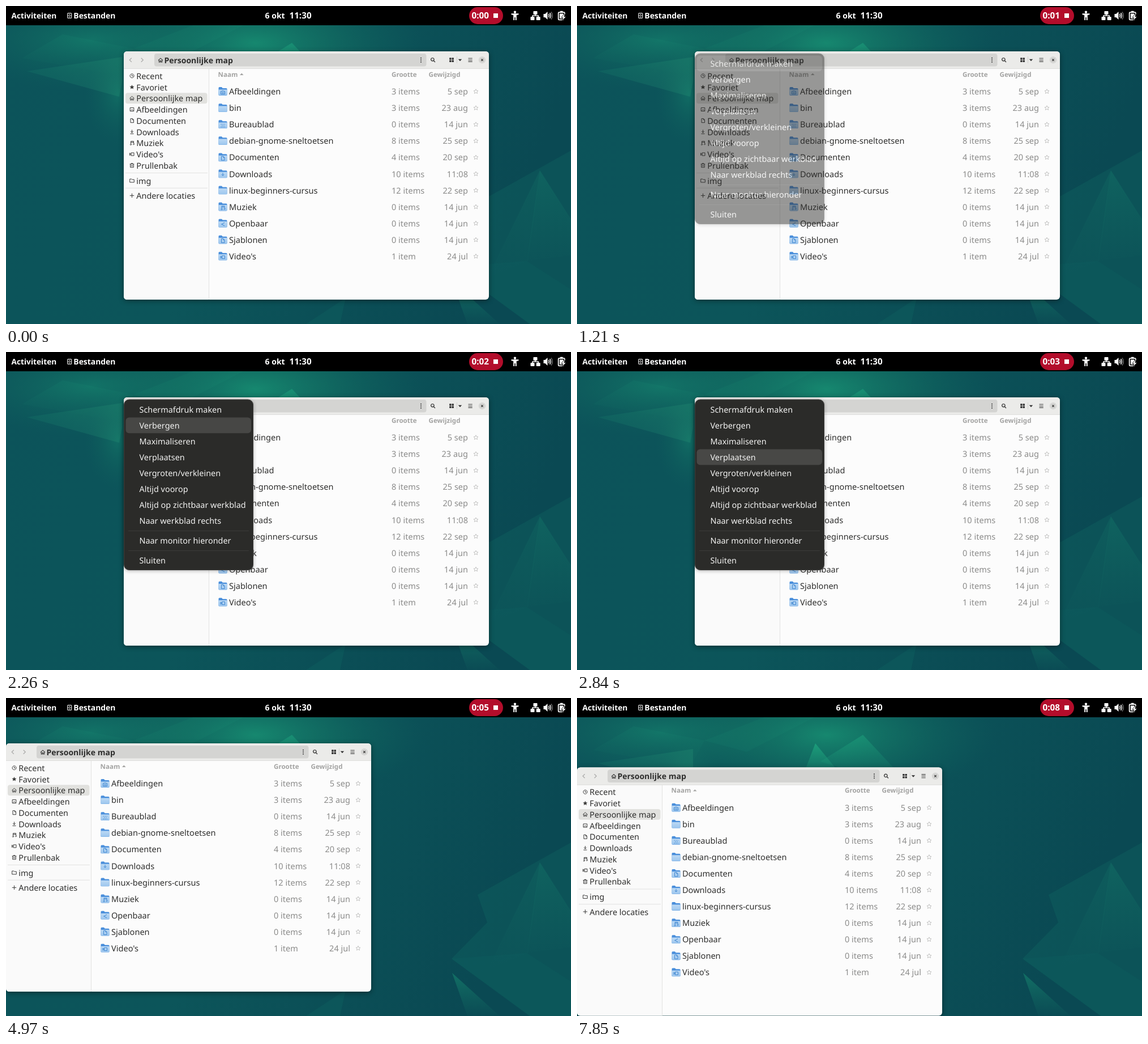
An HTML page that plays this animation: 998x561 px, repeating every 8 s.

```html
<!DOCTYPE html>
<html lang="nl">
<head>
<meta charset="utf-8">
<style>
html, body { margin: 0; width: 100%; height: 100%; overflow: hidden; background: #0a4c55; }
svg { display: block; width: 998px; height: 561px; }
text { font: 14.4px "Noto Sans", sans-serif; text-rendering: geometricPrecision; white-space: pre; }
.bar text { font-weight: 700; fill: #fff; }
.ink { fill: #2e2e2d; }
.dim { fill: #8b8b8a; }
.file { font-size: 14.55px; }
text.head { font-size: 11.6px; font-weight: 700; fill: #a3a3a2; }
.line { fill: none; stroke: #3b3b3a; stroke-width: 1.1; }
.emblem { fill: none; stroke: #3f86d0; stroke-width: 1; }
#window { filter: drop-shadow(0 2px 5px rgba(0, 0, 0, .42)); }
#menu { filter: drop-shadow(0 1px 3px rgba(0, 0, 0, .3)); }
#menu text { fill: #f3f3f2; }
</style>
</head>
<body>
<svg viewBox="0 0 998 561">
  <defs>
    <linearGradient id="base" x2="1" y2=".25">
      <stop offset="0" stop-color="#0c535a"/><stop offset=".5" stop-color="#0c555a"/><stop offset="1" stop-color="#0a4953"/>
    </linearGradient>
    <radialGradient id="glow">
      <stop offset="0" stop-color="#1a9b77" stop-opacity=".85"/><stop offset=".5" stop-color="#168068" stop-opacity=".45"/><stop offset="1" stop-color="#0f6a60" stop-opacity="0"/>
    </radialGradient>
    <linearGradient id="facet" x2="0" y2="1">
      <stop offset="0" stop-color="#20b184" stop-opacity=".65"/><stop offset="1" stop-color="#20a57d" stop-opacity=".05"/>
    </linearGradient>
    <linearGradient id="beam">
      <stop offset="0" stop-color="#1c9374" stop-opacity=".3"/><stop offset="1" stop-color="#2a9a78" stop-opacity=".5"/>
    </linearGradient>
    <linearGradient id="front" x2="0" y2="1">
      <stop offset="0" stop-color="#bcd9f4"/><stop offset="1" stop-color="#9cc6ee"/>
    </linearGradient>
  </defs>
  <g id="wallpaper"></g>
  <g id="window"></g>
  <g id="menu"></g>
  <g id="bar" class="bar"></g>
</svg>
<script>
const $ = id => document.getElementById(id);
const text = (x, y, s, attrs = 'class="ink"') => `<text x="${x}" y="${y}" ${attrs}>${s}</text>`;
const rect = (x, y, w, h, fill, r = 0, attrs = '') =>
  `<rect x="${x}" y="${y}" width="${w}" height="${h}" rx="${r}" fill="${fill}" ${attrs}/>`;
const path = (d, attrs = 'class="line"') => `<path d="${d}" ${attrs}/>`;
const at = (x, y, s) => `<g transform="translate(${x} ${y})">${s}</g>`;
const shape = (points, fill, opacity = 1) => `<polygon points="${points}" fill="${fill}" opacity="${opacity}"/>`;
const glow = (x, y, rx, ry, opacity) =>
  `<ellipse cx="${x}" cy="${y}" rx="${rx}" ry="${ry}" fill="url(#glow)" opacity="${opacity}"/>`;

// Small outline icons, drawn around 0,0
const note = 'M-2 2.5V-3H3V1.5M-2 -1.3H3M-3.3 2.6a1.2 1 0 1 0 1.3-1M1.7 1.9a1.2 1 0 1 0 1.3-1';
const page = 'M-2.5-3.5H1L3-1.5V3.5H-2.5ZM.8-3.3V-1.3H3';
const down = 'M0-3.5V1.5M-2.3-.8L0 1.5L2.3-.8';
const film = 'M-1.5-2.5H3.5V2.5H-1.5ZM-1.5 0L-4-2V2Z';
const house = 'M-4 .2L0-3.4L4 .2M-2.7-.6V3.3H-.8V1H.8V3.3H2.7V-.6';
const star = 'M0-4L1.2-1.3L4-1.1L1.9.8L2.6 3.6L0 2L-2.6 3.6L-1.9.8L-4-1.1L-1.2-1.3Z';

$('wallpaper').innerHTML =
  rect(0, 0, 998, 561, 'url(#base)') +
  glow(440, 65, 300, 115, .85) + glow(150, 60, 260, 90, .5) + glow(198, 155, 60, 90, .4) +
  shape('28,92 100,50 225,75 200,122', 'url(#facet)', .12) +
  shape('37,115 205,90 205,133 200,160', 'url(#beam)', .5) +
  shape('225,75 330,34 420,34 300,95', '#23a17d', .08) +
  shape('421,80 398,140 470,140', 'url(#facet)', .95) +
  shape('505,65 430,112 520,140 575,140', 'url(#facet)', .6) +
  shape('998,255 833,347 850,396 787,460 925,561 998,561', '#148a70', .15) +
  shape('943,290 998,376 998,440 920,450', 'url(#facet)', .25) +
  shape('943,290 922,450 850,480', 'url(#facet)', .15) +
  shape('787,460 920,450 998,500 998,561 925,561', '#11786a', .1) +
  shape('788,485 872,561 815,561', 'url(#facet)', .55) +
  shape('600,515 530,561 590,561', '#178a70', .12);

const places = [
  ['Recent', 'M0-3.5A3.5 3.5 0 1 0 .1-3.5M0-2V.3H2'], ['Favoriet', star], ['Persoonlijke map', house],
  ['Afbeeldingen', 'M-3.3-3H3.3V3H-3.3ZM-2 2L0 0L2.3 2'], ['Documenten', page],
  ['Downloads', down + 'M-3 3.5H3'], ['Muziek', note], ["Video's", film],
  ['Prullenbak', 'M-3.8-2.3H3.8M-1.3-2.5V-3.6H1.3V-2.5M-2.8-2.3V3.5H2.8V-2.3M-1-.3V1.8M1-.3V1.8'],
  ['img', 'M-3.8-2.8H-.8L.2-1.8H3.8V3H-3.8Z'], ['Andere locaties', 'M-3.7 0H3.7M0-3.7V3.7']
];
const placeY = i => i < 9 ? 123.6 + 19.75 * i : i === 9 ? 308.4 : 334.8;

const files = [
  ['Afbeeldingen', '3 items', '5 sep', 'M-3.5-2H-1.5L-.8-3H.8L1.5-2H3.5V3H-3.5ZM0-1A1.4 1.4 0 1 0 .1-1'],
  ['bin', '3 items', '23 aug', ''],
  ['Bureaublad', '0 items', '14 jun', 'M-3.5-2H-2M-.5-2H1M2.5-2H3.8M-2 .5H-.5M1.3 .5H2.6M-3.5 3H-2M-.5 3H1M2.5 3H3.8'],
  ['debian-gnome-sneltoetsen', '8 items', '25 sep', ''],
  ['Documenten', '4 items', '20 sep', page],
  ['Downloads', '10 items', '11:08', down],
  ['linux-beginners-cursus', '12 items', '22 sep', ''],
  ['Muziek', '0 items', '14 jun', note],
  ['Openbaar', '0 items', '14 jun', 'M2.4-2.5L-2 0L2.4 2.5M1.8-2.5h1.3M-2.8 0h1.3M1.8 2.5h1.3'],
  ['Sjablonen', '0 items', '14 jun', page],
  ["Video's", '1 item', '24 jul', film]
];
const folder = emblem =>
  path('M-7.5-6Q-7.5-7.5-6-7.5H-2L-.3-5.6H6Q7.5-5.6 7.5-4.1V6Q7.5 7.3 6 7.3H-6Q-7.5 7.3-7.5 6Z', 'fill="#4a8fdb"') +
  rect(-7.5, -3.2, 15, 10.2, 'url(#front)', 1.2) + at(0, 1.8, path(emblem, 'class="emblem"'));

const header =
  path('M208 111V86Q208 80 214 80H847Q853 80 853 86V111Z', 'fill="#ebebe9"') +
  rect(208, 110, 645, 1, '#dededc') + rect(262, 84, 480.5, 22.5, '#d4d4d2', 4) +
  path('M221.8 91.7L218.2 95.2L221.8 98.7M238.7 91.7L242.3 95.2L238.7 98.7', 'fill="none" stroke="#aaaaa9" stroke-width="1.2"') +
  at(273, 95.6, path(house)) + text(279.4, 100.6, 'Persoonlijke map', 'class="ink" style="font-weight:700;font-size:14px"') +
  [91.7, 95.2, 98.7].map(y => rect(732, y - 1, 2, 2, '#333', 1)).join('') +
  path('M753.3 91.6A2.7 2.7 0 1 0 753.4 91.6M755.4 96.4L758 99', 'class="line" style="stroke-width:1.4"') +
  [0, 4.3].map(d => rect(783.2 + d, 91.3, 3.4, 3.4, '#333', .4) + rect(783.2 + d, 95.6, 3.4, 3.4, '#333', .4)).join('') +
  rect(796, 89, 1, 12, '#d2d2d0') + shape('798.8,93.7 805.2,93.7 802,97.2', '#333') +
  path('M816.5 92.3H823.7M816.5 95.2H823.7M816.5 98.1H823.7') +
  '<circle cx="841" cy="95.2" r="6.2" fill="#d6d6d4"/>' + path('M839.2 93.4L842.8 97M842.8 93.4L839.2 97');

$('window').innerHTML =
  rect(208, 80, 645, 438, '#fcfcfc', 6) +
  path('M208 110H358.5V518H214Q208 518 208 512Z', 'fill="#fafafa"') + rect(358, 110, 1, 408, '#e3e3e2') +
  header + rect(211, 153.3, 144.5, 18.9, '#e1e1de', 4) +
  rect(211, 294, 145, 1, '#e2e2e1') + rect(211, 320.7, 145, 1, '#e2e2e1') +
  places.map(([name, icon], i) =>
    at(222.5, placeY(i) - .4, path(icon, icon === star ? 'fill="#3b3b3a"' : 'class="line" style="stroke-width:1"')) +
    text(230.3, placeY(i) + 5.2, name)).join('') +
  text(374.5, 124.7, 'Naam', 'class="head"') + shape('413,122 419.6,122 416.3,118.6', '#a3a3a2') +
  text(681, 124.7, 'Grootte', 'class="head"') + text(746.6, 124.7, 'Gewijzigd', 'class="head"') +
  files.map(([name, size, date, emblem], i) => {
    const y = 151 + 29.07 * i;
    return at(383, y - .4, folder(emblem)) + text(394, y + 5.2, name, 'class="ink file"') +
      text(681, y + 5.2, size, 'class="dim file"') + text(816, y + 5.2, date, 'class="dim file" text-anchor="end"') +
      at(830, y - .3, path(star, 'fill="none" stroke="#bdbdbc" stroke-width=".9"'));
  }).join('');

const actions = ['Schermafdruk maken', 'Verbergen', 'Maximaliseren', 'Verplaatsen', 'Vergroten/verkleinen',
  'Altijd voorop', 'Altijd op zichtbaar werkblad', 'Naar werkblad rechts', 'Naar monitor hieronder', 'Sluiten'];
const focusTimes = [1100, 2000, 2260, 2480];

$('menu').innerHTML =
  rect(208.5, 84, 228, 300.5, '#2b2b29', 9, 'stroke="#3d3d3b"') +
  focusTimes.map((_, i) => rect(211.5, 115.5 + 28 * (i - 1), 221.5, 27.8, '#484846', 6, 'class="focus"')).join('') +
  rect(216, 315, 213, 1, '#3b3b39') + rect(216, 350, 213, 1, '#3b3b39') +
  actions.map((s, i) => text(235.5, 107 + 28 * i + 7 * Math.max(0, i - 7), s, '')).join('');

$('bar').innerHTML =
  rect(0, 0, 998, 34, '#000') + text(9.5, 22, 'Activiteiten', 'style="font-size:13.7px"') +
  rect(108.7, 12.7, 7, 8.6, 'none', 1, 'stroke="#ddd" stroke-width="1.2"') +
  path('M108.7 17H115.7M111 15H113.4M111 19.2H113.4', 'stroke="#ddd"') +
  text(119.3, 22, 'Bestanden', 'style="font-size:13.9px"') +
  text(457.6, 22, '6 okt', 'style="font-size:14px"') + text(500.5, 22, '11:30', 'style="font-size:15.2px"') +
  rect(818, 2, 60, 30, '#b30d2b', 15) + text(822.5, 22, '0:00', 'id="timer" style="font-size:15.3px"') +
  rect(861, 13, 8, 8, '#fff') +
  '<circle cx="899" cy="10.8" r="2.2" fill="#fff"/>' +
  path('M892.5 13.3H905.5V15.3L901.8 16V25H899.8V20H898.2V25H896.2V16L892.5 15.3Z', 'fill="#fff"') +
  rect(931.5, 9, 7, 6, '#fff', 1) + rect(926.5, 19, 7, 6, '#fff', 1) + rect(936.7, 19, 7, 6, '#fff', 1) +
  path('M935 14V17M930 20V17H940.2V20', 'fill="none" stroke="#fff" stroke-width="1.6"') +
  path('M949.5 14H952.3L956.5 10V24L952.3 20H949.5Z', 'fill="#fff"') +
  path('M958.5 14.3Q960.5 17 958.5 19.7M960.6 12.3Q964 17 960.6 21.7', 'fill="none" stroke="#fff" stroke-width="1.5"') +
  path('M963 10.4Q967.5 17 963 23.6', 'fill="none" stroke="#777" stroke-width="1.4"') +
  path('M984.5 24.3H977Q975.7 24.3 975.7 23V12.5Q975.7 11.2 977 11.2H985.5Q986.8 11.2 986.8 12.5V15M979 9.7H983.5', 'fill="none" stroke="#fff" stroke-width="1.8"') +
  rect(978, 13.4, 6.5, 8.6, '#fff') +
  path('M985.5 14.5L980.8 20.3H983.8L982.5 26L989.3 18.7H985.8L987.4 14.5Z', 'fill="#fff" stroke="#000" stroke-width=".8"');

const ramp = (t, start, length) => Math.min(1, Math.max(0, (t - start) / length));
const focusMarks = document.querySelectorAll('.focus');

function draw(now) {
  const t = now % 8000;
  $('timer').textContent = '0:0' + Math.floor((t + 174) / 1002);
  $('window').setAttribute('transform', `translate(${t < 4970 ? 0 : -208} ${t < 7380 ? 0 : 42.6})`);
  $('menu').setAttribute('opacity', t < 3790 ? ramp(t, 1130, 170) : 0);
  focusMarks.forEach((mark, i) => {
    const leave = focusTimes[i + 1] ?? Infinity;
    mark.setAttribute('opacity', ramp(t, focusTimes[i], 110) - ramp(t, leave, 110));
  });
  requestAnimationFrame(draw);
}
draw(performance.now());
</script>
</body>
</html>
```
